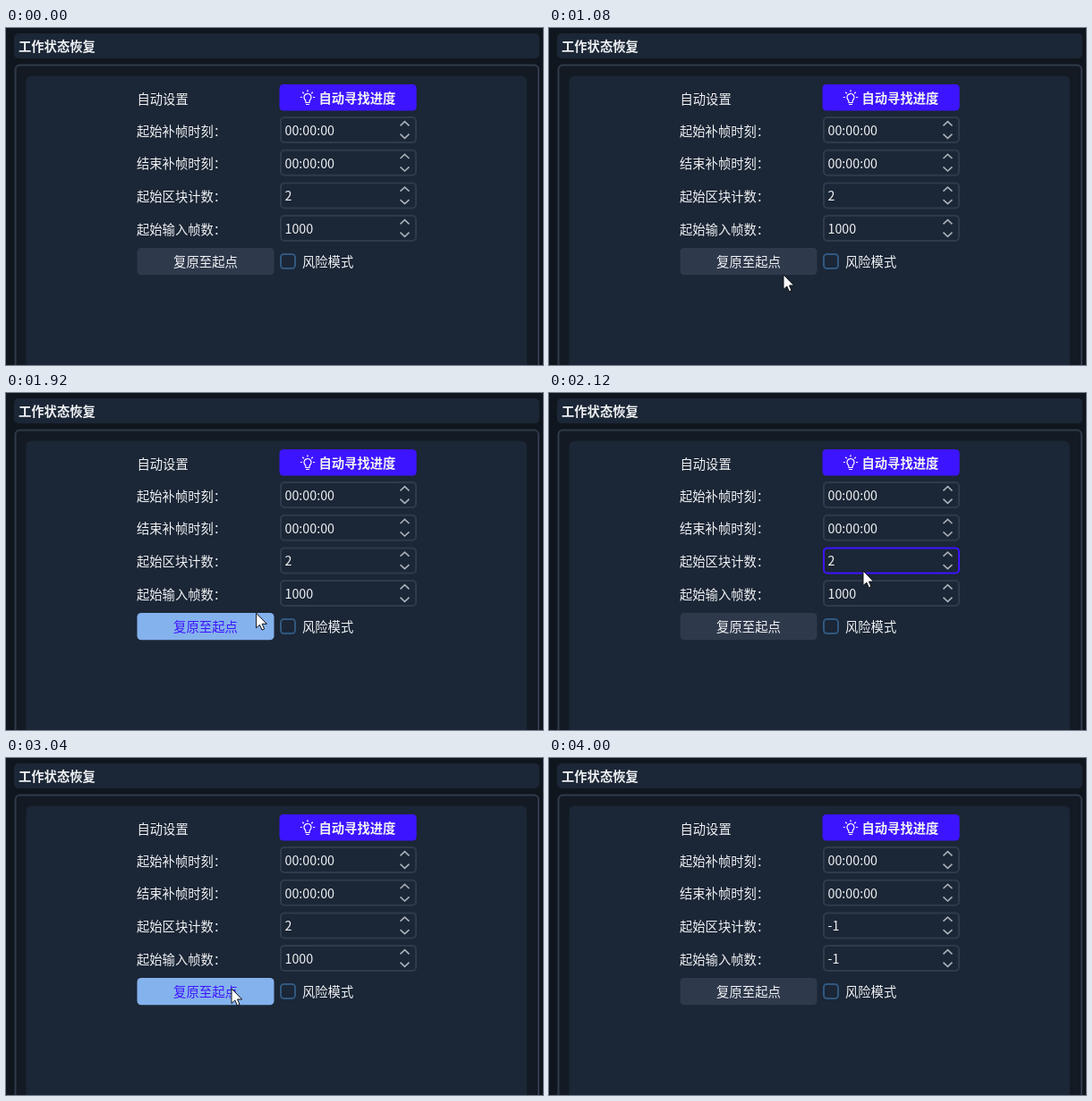
Animation of 600x377 px, one loop 4.4 s. Source, as an HTML page with a canvas:

```html
<!DOCTYPE html>
<html lang="zh-CN">
<head>
<meta charset="utf-8">
<title>工作状态恢复</title>
<style>
html, body { margin: 0; width: 100%; height: 100%; overflow: hidden; background: #10161d; }
canvas { display: block; width: 600px; height: 377px; }
</style>
</head>
<body>
<canvas id="stage"></canvas>
<script>
const LOOP = 4400, STEP = 40, W = 600, H = 377;
const canvas = document.getElementById('stage');
const ctx = canvas.getContext('2d');
const dpr = window.devicePixelRatio || 1;
canvas.width = W * dpr;
canvas.height = H * dpr;

const CJK = '"Noto Sans CJK SC", "Noto Sans CJK", sans-serif';
const C = {
  back: '#10161d', well: '#131a23', panel: '#1b2636', line: '#2f3a4b',
  button: '#2f394c', hover: '#84b2ed', accent: '#3d14ff',
  text: '#f0f2f4', arrow: '#a9b0ba', check: '#30587f'
};

// Pointer path: time, x, y
const path = [
  [720, 292, 346], [1080, 262, 276], [1280, 262, 258], [1840, 262, 258],
  [2120, 351, 199], [2320, 354, 195], [2600, 354, 195], [3040, 252, 258],
  [3200, 253, 259], [3440, 279, 265], [3520, 300, 272], [3720, 574, 355],
  [3800, 606, 380]
];

function pointer(t) {
  if (t < path[0][0] || t >= path[path.length - 1][0]) return null;
  const i = path.findIndex(p => p[0] > t);
  const [t0, x0, y0] = path[i - 1], [t1, x1, y1] = path[i];
  const u = (t - t0) / (t1 - t0);
  const e = u * u * (3 - 2 * u);
  return { x: x0 + (x1 - x0) * e, y: y0 + (y1 - y0) * e };
}

function inside(p, x, y, w, h) {
  return p && p.x >= x && p.x < x + w && p.y >= y && p.y < y + h;
}

function box(x, y, w, h, r, fill, stroke, width = 2) {
  ctx.beginPath();
  ctx.roundRect(x, y, w, h, r);
  if (fill) { ctx.fillStyle = fill; ctx.fill(); }
  if (stroke) { ctx.strokeStyle = stroke; ctx.lineWidth = width; ctx.stroke(); }
}

function label(str, x, y, { size = 14.3, weight = 400, color = C.text, align = 'left' } = {}) {
  ctx.font = `${weight} ${size}px ${CJK}`;
  ctx.fillStyle = color;
  ctx.textAlign = align;
  ctx.fillText(str, x, y);
}

function chevron(x, y, dir) {
  ctx.beginPath();
  ctx.moveTo(x - 5, y + 2.3 * dir);
  ctx.lineTo(x, y - 2.3 * dir);
  ctx.lineTo(x + 5, y + 2.3 * dir);
  ctx.strokeStyle = C.arrow;
  ctx.lineWidth = 1.6;
  ctx.stroke();
}

function spinRow(name, value, y, p) {
  label(name, 146, y + 21.5);
  const hot = inside(p, 306, y, 153, 30);
  box(307, y + 1, 151, 28, 4, null, hot ? C.accent : C.line);
  label(value, 311.5, y + 21);
  chevron(445.5, y + 8, 1);
  chevron(445.5, y + 22, -1);
}

function bulb(x, y) {
  ctx.strokeStyle = '#fff';
  ctx.lineWidth = 1.2;
  ctx.beginPath();
  ctx.arc(x, y, 4, 0.7 * Math.PI, 2.3 * Math.PI);
  ctx.lineTo(x + 2, y + 6);
  ctx.lineTo(x - 2, y + 6);
  ctx.closePath();
  ctx.moveTo(x - 2, y + 8);
  ctx.lineTo(x + 2, y + 8);
  for (let i = 0; i < 5; i++) {
    const a = Math.PI * (1 + i / 4);
    ctx.moveTo(x + 6 * Math.cos(a), y + 6 * Math.sin(a));
    ctx.lineTo(x + 8.2 * Math.cos(a), y + 8.2 * Math.sin(a));
  }
  ctx.stroke();
}

function arrowCursor({ x, y }) {
  const pts = [[0, 0], [0, 16.5], [3.8, 13], [6.4, 18.8], [9, 17.6], [6.5, 12], [11.7, 12]];
  ctx.beginPath();
  pts.forEach(([a, b]) => ctx.lineTo(x + a, y + b));
  ctx.closePath();
  ctx.fillStyle = '#fff';
  ctx.fill();
  ctx.strokeStyle = '#0b0e12';
  ctx.lineWidth = 1;
  ctx.stroke();
}

function draw(t) {
  const p = pointer(t);
  const done = t >= 3280;
  ctx.setTransform(dpr, 0, 0, dpr, 0, 0);
  ctx.fillStyle = C.back;
  ctx.fillRect(0, 0, W, H);

  box(9, 6, 587, 28, 5, C.panel);
  label('工作状态恢复', 14, 26, { weight: 700 });
  box(10.5, 41.5, 584.5, 350, 5, C.well, C.line);
  box(22.5, 53.5, 559.5, 340, 6, C.panel);

  label('自动设置', 146.5, 84.5);
  box(305.5, 63, 153.2, 29.5, 4.5, C.accent);
  bulb(337, 77.5);
  label('自动寻找进度', 349.5, 83.5, { weight: 700 });

  spinRow('起始补帧时刻：', '00:00:00', 99, p);
  spinRow('结束补帧时刻：', '00:00:00', 135.7, p);
  spinRow('起始区块计数：', done ? '-1' : '2', 172.4, p);
  spinRow('起始输入帧数：', done ? '-1' : '1000', 209, p);

  const hot = inside(p, 146, 246, 153, 30);
  box(146.5, 246, 153, 30.3, 4.5, hot ? C.hover : C.button);
  label('复原至起点', 223, 267, { size: 14.4, align: 'center', color: hot ? C.accent : C.text });
  box(307, 253, 16, 16, 3.5, null, C.check);
  label('风险模式', 331, 267);

  if (p) arrowCursor(p);
}

const start = performance.now();
function tick() {
  const t = (performance.now() - start) % LOOP;
  draw(Math.floor(t / STEP) * STEP);
  requestAnimationFrame(tick);
}
tick();
</script>
</body>
</html>
```
